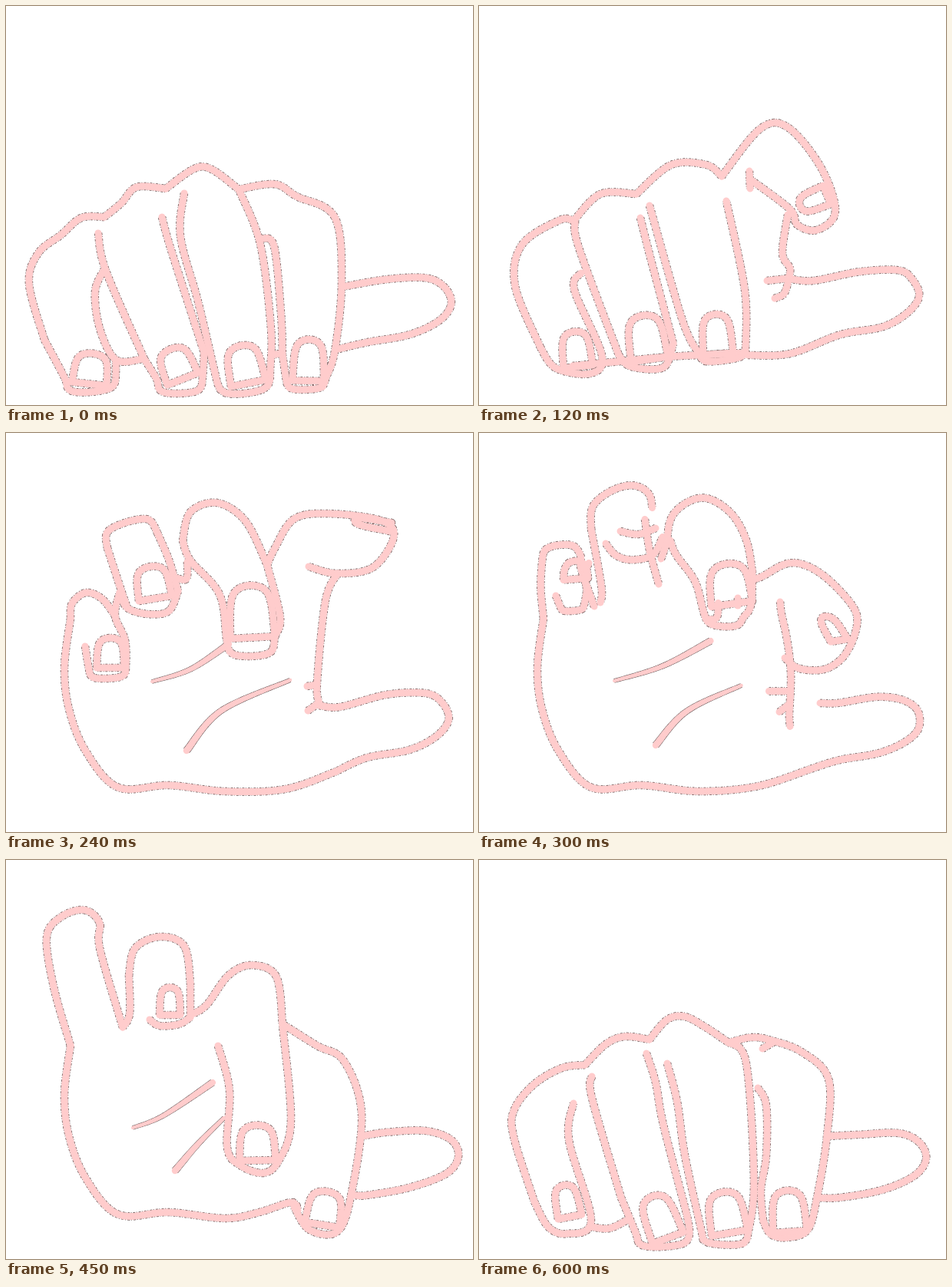
These frames come from a looping animation (608 px wide and 520 px high, 630 ms). An HTML page with a canvas:

```html
<!DOCTYPE html>
<html lang="en">
<head>
<meta charset="utf-8">
<title>Drumming fingers</title>
<style>
html, body { margin: 0; width: 100%; height: 100%; overflow: hidden; background: #fff; }
canvas { display: block; }
</style>
</head>
<body>
<canvas id="stage" width="608" height="520"></canvas>
<script>
const LOOP = 630, STEP = 30, SAMPLES = 72;
const PINK = '#ffcccc', EDGE = '#705c5c', WIDTH = 9;
const TAPER = { a: [4, 8], b: [8.5, 4.5] };
const NAILS = 'prmi';
const PALM = '84 242,76 305,82 360,104 415,146 462,212 459,285 467,';

const mix = (a, b, k) => a + (b - a) * k;
const wave = (time, peak) => Math.cos(2 * Math.PI * (time - peak) / LOOP);

// The thumb sways and lifts once per loop; the hand hides its two ends
function thumb(time, from, to) {
  const tip = 581 + 8 * wave(time, 457), y = 348 - 9 * wave(time, 235);
  return `${from},495 ${y + 2},546 ${y},${tip - 9} ${y + 12},${tip} ${y + 34},` +
    `${tip - 16} ${y + 56},525 ${y + 74},470 ${y + 84},${to}`;
}

// Key points per stroke; "A~d B" is a round end from A to B, d deep.
// P Q pinky, K R F N ring, L M middle, I W index, B palm,
// T thumb ends, a b palm creases, the rest small wrinkles.
const poses = [
  { at: 0, T: ['438 366', '433 447'],
    P: '128 275,98 276,72 298,42 322,30 362,50 435',
    Q: '50 435,76 484~22 143 478,143 461',
    B: '128 343,116 372,122 420,143 461,178 460',
    K: '128 275,150 257,170 236,208 238',
    L: '208 238,245 212,268 213,303 239',
    R: '120 296,130 345,180 460',
    F: '180 460,196 486~20 256 484,258 452',
    N: '203 275,215 318,258 452',
    M: '232 244,227 300,250 385,273 482~27 344 474,345 420,331 310,303 239',
    I: '303 239,350 232,378 248,428 275,437 360,428 450,416 486~-13 365 488,360 455',
    W: '333 303,349 313,358 400,360 455',
    p: '86 490~-40 131 495', r: '210 494~-42 250 478',
    m: '293 496~-50 338 487', i: '373 488~-54 414 489',
    x: '346 455,356 453' },
  { at: 120, T: ['402 355,435 358', '405 453,350 455'],
    P: '123 280,105 279,56 311,47 365,80 445',
    Q: '80 445,100 472,145 479,160 455,124 370,133 348',
    B: '122 469,185 463,248 457,345 452',
    K: '123 280,158 245,205 245',
    L: '205 245,250 207,296 207,316 222',
    R: '125 280,130 315,182 455',
    F: '182 455,198 470,240 471,253 440',
    N: '210 276,225 335,253 440',
    M: '222 260,265 410,287 454~12 347 446,346 370,322 254',
    I: '316 222,366 160,402 158,445 210,464 268,440 292,414 285,405 265,352 225',
    W: '402 272,395 322,405 342,402 357',
    p: '110 472~-46 148 468', r: '198 464~-58 246 457',
    m: '292 455~-52 331 452', i: '458 258~-38 448 234',
    v: '352 215,353 238', x: '375 358,402 355', y: '385 381,397 375,403 358' },
  { at: 240, T: ['408 355,435 357', '430 441'],
    P: '142 238,125 216,104 208,86 222,84 242',
    Q: '103 278,108 308~13 156 306,155 270,142 238,148 208',
    B: PALM + '364 464,430 441',
    K: '132 150~-25 197 130',
    L: '230 140,240 103,275 91,312 115,340 172',
    R: '132 150,150 205,158 228',
    F: '148 208,158 228,185 236,212 232,224 206',
    N: '197 130,212 165,224 206',
    M: '230 140,240 166,278 210,287 268~24 350 266,357 240,340 172',
    I: '340 172,350 150,375 112,420 105,488 114,505 135,478 175,430 183,394 174',
    W: '432 183,416 218,405 325,408 353',
    p: '118 306~-39 154 306', r: '173 219~-42 216 212',
    m: '292 268~-68 350 265', i: '500 128~-48 502 117',
    a: '190 324,240 308,290 275', b: '235 414,280 362,370 322',
    v: '236 168,235 190,222 189', x: '392 330,405 328', y: '393 362,407 352' },
  { at: 360, T: ['480 349', '430 436'],
    P: '158 214,137 135,142 108~32 70 122,76 180,84 242',
    Q: '97 146,118 142,138 131',
    B: PALM + '360 457,430 436',
    K: '160 100,165 60,192 33,225 24,252 42,254 65',
    L: '244 188,256 160,260 110,300 75,345 95,370 140,372 190',
    R: '160 100,167 190,158 214',
    F: '182 80,210 95,240 86,254 65',
    N: '235 95,232 140,244 188',
    M: '268 140,302 205,345 213,372 185',
    I: '362 213,385 226,440 230,472 275,479 375,455 430,415 432,402 412',
    W: '352 257,384 292,404 345,402 412',
    p: '102 77~-8 130 72', m: '313 185~-38 362 173', i: '416 416~-53 458 420',
    a: '162 322,240 299,313 267', b: '225 400,262 362,313 336',
    s: '184 128,207 132,230 124', w: '337 225,337 215',
    v: '387 275,384 292,369 296', x: '363 343,402 345', y: '389 365,402 354' },
  { at: 450, T: ['463 360', '455 437'],
    P: '152 218,122 115,122 82,102 65,72 74,53 100,62 165,84 242',
    B: PALM + '330 459,372 446,380 457',
    K: '160 150,168 115,200 100,232 112,240 160',
    L: '245 200,262 188,290 150,320 137,352 152,360 215',
    R: '160 150,161 200,152 218',
    F: '187 208,200 216,225 214,240 205',
    N: '240 160,240 205',
    M: '276 242,291 300,288 375,305 398,335 408,355 392,371 340,360 215',
    I: '362 215,405 242,440 262,463 330,450 433,432 484,395 482,375 452',
    r: '200 202~-36 227 202', m: '304 392~-46 351 391', i: '389 472~-44 434 479',
    a: '165 349,205 333,269 290', b: '220 405,250 370,284 336' },
  { at: 540, T: ['455 362', '442 442'],
    P: '120 258,90 237,58 248,38 290,34 350,48 385',
    Q: '48 385,72 415,98 412,113 395,103 340,102 290',
    B: '100 415,108 440,135 470,202 472',
    K: '120 258,145 258,180 225,202 218,232 226',
    L: '232 226,262 202,290 202,332 228',
    R: '151 278,160 325,185 415,203 475',
    F: '203 475,214 492~11 270 488,266 432',
    N: '235 276,241 345,266 432',
    M: '249 255,262 310,284 430,287 480~10 352 482,358 400,355 275,332 228',
    I: '332 228,355 224,380 228,400 241,440 255,460 280,460 340,445 440,425 480,400 484,375 462',
    W: '378 288,375 330,380 370,372 462',
    p: '62 405~-36 94 402', r: '222 490~-52 262 482',
    m: '300 488~-52 345 485', i: '380 468~-42 426 477',
    x: '360 312,372 318' },
  { at: 600, T: ['453 360', '440 440'],
    P: '138 267,108 271,72 292,46 325,45 360,72 445',
    Q: '72 445,90 478,114 487,146 470,117 365,123 317',
    B: '145 478,170 480,195 468',
    K: '138 267,165 240,190 230,222 234',
    L: '222 234,245 208,268 204,295 218,325 238',
    R: '147 282,147 310,185 440',
    F: '185 440,204 486~20 274 482,270 460',
    N: '218 252,230 290,240 345,270 460',
    M: '245 265,258 315,268 385,290 485~15 350 488,358 420,348 265,325 238',
    I: '325 238,355 231,380 235,420 250,455 285,453 360,440 440,428 482,402 492,380 488,370 470',
    W: '363 297,374 320,374 385,367 430,370 470',
    p: '103 468~-42 134 462', r: '226 500~-58 266 485',
    m: '303 490~-54 350 482', i: '383 486~-54 427 483',
    v: '384 237,369 246' }
];

// Points between two ends of a rounded, slightly square cap
function cap([ax, ay], [bx, by], depth) {
  const dx = bx - ax, dy = by - ay, size = Math.hypot(dx, dy), out = [];
  for (let n = 1; n < 6; n++) {
    const c = Math.cos(Math.PI * n / 6), s = Math.sin(Math.PI * n / 6);
    const along = 0.5 - 0.5 * Math.sign(c) * Math.abs(c) ** 0.65;
    const out1 = depth * s ** 0.65 / size;
    out.push([ax + dx * along - dy * out1, ay + dy * along + dx * out1]);
  }
  return out;
}

function parse(text) {
  const point = s => s.trim().split(' ').map(Number);
  return text.split(',').flatMap(part => {
    const [a, end] = part.split('~');
    if (!end) return [point(a)];
    const [depth, ...b] = point(end);
    return [point(a), ...cap(point(a), b, depth), b];
  });
}

// Smooth curve through the points, as evenly spaced samples
function trace(pts) {
  const dense = [pts[0]], len = [0];
  for (let n = 0; n < pts.length - 1; n++) {
    const p1 = pts[n], p2 = pts[n + 1];
    const p0 = pts[n - 1] || p1, p3 = pts[n + 2] || p2;
    for (let s = 1; s <= 12; s++) {
      const t = s / 12;
      const q = [0, 1].map(c => p1[c] + 0.5 * t * (p2[c] - p0[c] +
        t * (2 * p0[c] - 5 * p1[c] + 4 * p2[c] - p3[c] +
        t * (3 * p1[c] - p0[c] - 3 * p2[c] + p3[c]))));
      const last = dense[dense.length - 1];
      len.push(len[len.length - 1] + Math.hypot(q[0] - last[0], q[1] - last[1]));
      dense.push(q);
    }
  }
  const total = len[len.length - 1], out = [];
  for (let n = 0, j = 1; n <= SAMPLES; n++) {
    const d = total * n / SAMPLES;
    while (j < len.length - 1 && len[j] < d) j++;
    const k = (d - len[j - 1]) / (len[j] - len[j - 1] || 1);
    out.push([0, 1].map(c => mix(dense[j - 1][c], dense[j][c], k)));
  }
  return out;
}

const keys = poses.map(({ at, T, ...lines }) => {
  const strokes = { T: trace(parse(thumb(at, ...T))) };
  for (const id in lines) {
    const pts = trace(parse(lines[id]));
    strokes[id] = NAILS.includes(id) ? [...pts, pts[0]] : pts;
  }
  return { at, strokes };
});
keys.push({ at: LOOP, strokes: keys[0].strokes });

function poseAt(time) {
  const n = keys.findIndex(key => key.at > time) - 1;
  const from = keys[n], to = keys[n + 1];
  const k = (time - from.at) / (to.at - from.at);
  const near = k < 0.5 ? from.strokes : to.strokes;
  const strokes = {};
  for (const id in { ...from.strokes, ...to.strokes }) {
    const a = from.strokes[id], b = to.strokes[id];
    if (a && b) strokes[id] = a.map((p, j) => [mix(p[0], b[j][0], k), mix(p[1], b[j][1], k)]);
    else if (near[id]) strokes[id] = near[id];
  }
  return strokes;
}

const ctx = document.getElementById('stage').getContext('2d');
ctx.lineJoin = 'round';

function line(pts, width) {
  ctx.lineWidth = width;
  ctx.beginPath();
  pts.forEach(p => ctx.lineTo(p[0], p[1]));
  ctx.stroke();
}

function layer(strokes, color, grow, ends, dash) {
  ctx.strokeStyle = color;
  ctx.lineCap = ends;
  ctx.setLineDash(dash);
  for (const id in strokes) {
    const pts = strokes[id], taper = TAPER[id];
    if (!taper) { line(pts, WIDTH + grow); continue; }
    for (let n = 0; n < SAMPLES; n++) {
      line(pts.slice(n, n + 2), mix(taper[0], taper[1], n / SAMPLES) + grow);
    }
  }
}

function draw(time) {
  const strokes = poseAt(time);
  ctx.fillStyle = '#fff';
  ctx.fillRect(0, 0, 608, 520);
  layer(strokes, EDGE, 1.5, 'butt', [3, 1.5, 1, 2]);
  layer(strokes, PINK, 0, 'round', []);
}

const start = performance.now();
let shown = -1;
function tick() {
  const time = Math.floor((performance.now() - start) % LOOP / STEP) * STEP;
  if (time !== shown) draw(shown = time);
  requestAnimationFrame(tick);
}
tick();
</script>
</body>
</html>
```
